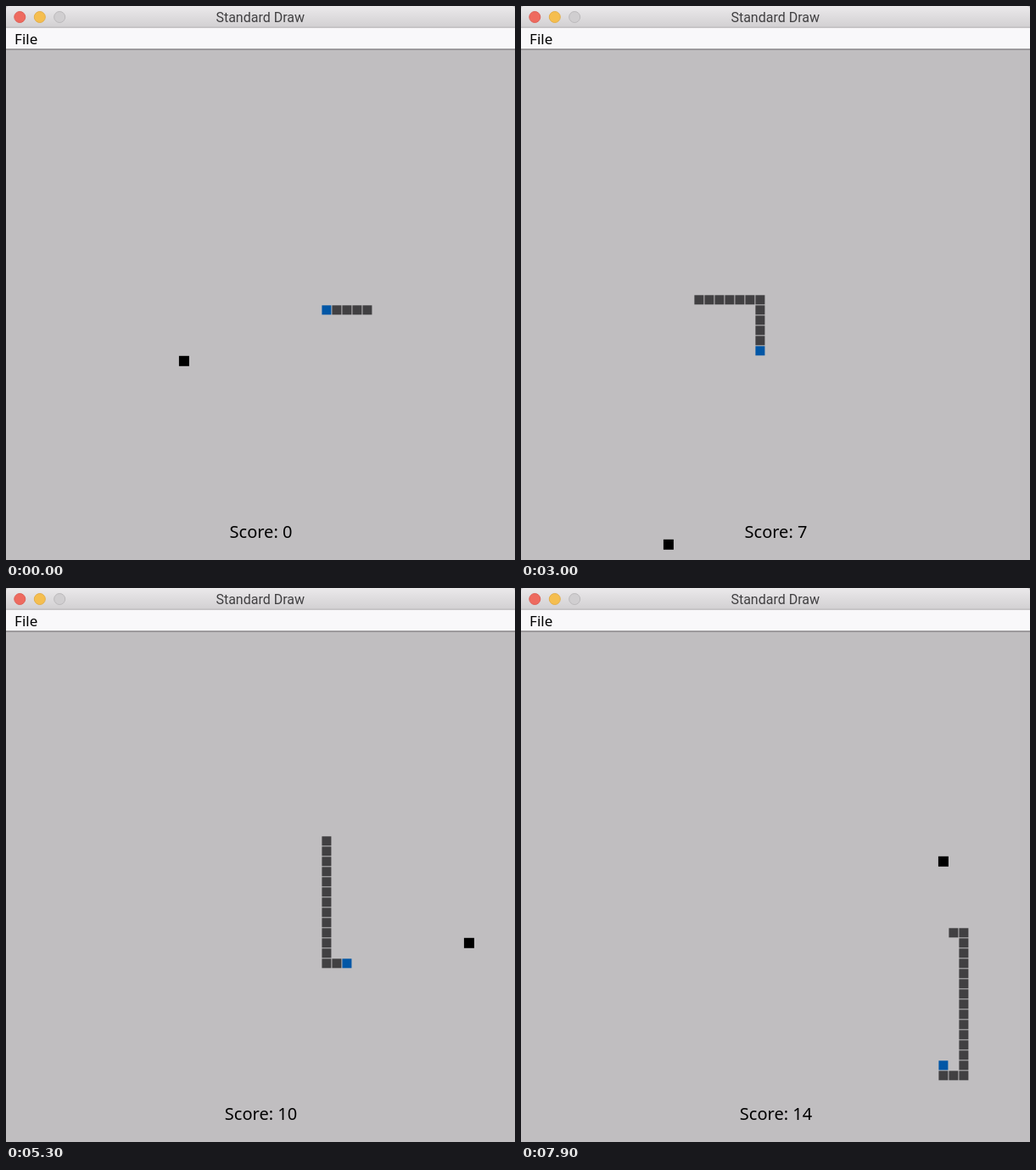
These frames come from a looping animation (600x652 px, 8000 ms). An HTML page:

```html
<!DOCTYPE html>
<html lang="en">
<head>
<meta charset="utf-8">
<title>Snake</title>
<style>
  html, body { margin: 0; width: 100%; height: 100%; overflow: hidden; background: #c0bec0; }
  svg { display: block; width: 600px; height: 652px; }
  text { font-family: "Noto Sans", "Open Sans", sans-serif; }
  .title { font: 16px Roboto, sans-serif; fill: #414042; }
</style>
</head>
<body>
<svg viewBox="0 0 600 652">
  <defs>
    <linearGradient id="bar" x2="0" y2="1">
      <stop offset="0" stop-color="#ebe9eb"/>
      <stop offset="1" stop-color="#d2d0d2"/>
    </linearGradient>
  </defs>
  <rect width="600" height="652" fill="#c0bec0"/>
  <path d="M0 25V4Q0 0 4 0H596Q600 0 600 4V25Z" fill="url(#bar)"/>
  <rect y="24.6" width="600" height="1.2" fill="#b6b4b6"/>
  <rect y="25.8" width="600" height="24.8" fill="#f9f8fa"/>
  <rect y="50.4" width="600" height="1.2" fill="#7c7a7c"/>
  <circle cx="16.3" cy="13" r="6.5" fill="#ee6a5f" stroke="#de5f55"/>
  <circle cx="39.8" cy="13" r="6.5" fill="#f5be4f" stroke="#e3ae49"/>
  <circle cx="63.2" cy="13" r="6.5" fill="#d0ced0" stroke="#bbb9bb"/>
  <text class="title" x="299.7" y="18.7" text-anchor="middle">Standard Draw</text>
  <text x="10.1" y="45" font-size="17">File</text>
  <g id="board">
    <rect id="food" width="12" height="12"/>
  </g>
  <text id="score" x="300.5" y="626.3" font-size="20" text-anchor="middle"></text>
</svg>
<script>
  const CELL = 12, LEFT = -0.1, TOP = 3.8;
  const LOOP = 8000, FRAME = 100, STEPS_PER_FRAME = 5, START_LENGTH = 5;
  const DIRECTIONS = { L: [-1, 0], R: [1, 0], U: [0, -1], D: [0, 1] };

  // Each leg is a direction and a length; "*n" puts food n cells before its end.
  const legs = `L18 D8*3 L9 D10*2 R10 U36*4 R8*2 D4 L3 D8*3 L15 D5*4 R15*1 D24 L22*13
    U1 R22 U28*10 R8*3 D13 R14 U26*24*3 L27 D23*0 R25 D14*2 L2 U21*0`;

  const route = [[35, 29]];
  const meals = []; // route indices where food is eaten
  for (const leg of legs.split(/\s+/)) {
    const [dx, dy] = DIRECTIONS[leg[0]];
    const [length, ...offsets] = leg.slice(1).split("*").map(Number);
    for (let i = 0; i < length; i++) {
      const [x, y] = route.at(-1);
      route.push([x + dx, y + dy]);
    }
    meals.push(...offsets.map(offset => route.length - 1 - offset));
  }

  const board = document.getElementById("board");
  const food = document.getElementById("food");
  const score = document.getElementById("score");

  function place(rect, [col, row], inset) {
    rect.setAttribute("x", LEFT + col * CELL + inset);
    rect.setAttribute("y", TOP + row * CELL + inset);
  }

  const segments = Array.from({ length: START_LENGTH + meals.length }, (_, i) => {
    const rect = document.createElementNS("http://www.w3.org/2000/svg", "rect");
    rect.setAttribute("width", 11);
    rect.setAttribute("height", 11);
    rect.setAttribute("fill", i ? "#414042" : "#0257a6");
    return board.appendChild(rect);
  });

  function draw(time) {
    const frame = Math.floor((time % LOOP) / FRAME);
    const head = START_LENGTH - 1 + frame * STEPS_PER_FRAME;
    const points = meals.filter(index => index <= head).length;

    segments.forEach((rect, i) => {
      const visible = i < START_LENGTH + points;
      rect.setAttribute("visibility", visible ? "visible" : "hidden");
      if (visible) place(rect, route[head - i], 0.5);
    });
    place(food, route[meals[points]], 0);
    score.textContent = "Score: " + points;
  }

  let start;
  function tick(now) {
    start ??= now;
    draw(now - start);
    requestAnimationFrame(tick);
  }
  draw(0);
  requestAnimationFrame(tick);
</script>
</body>
</html>
```
